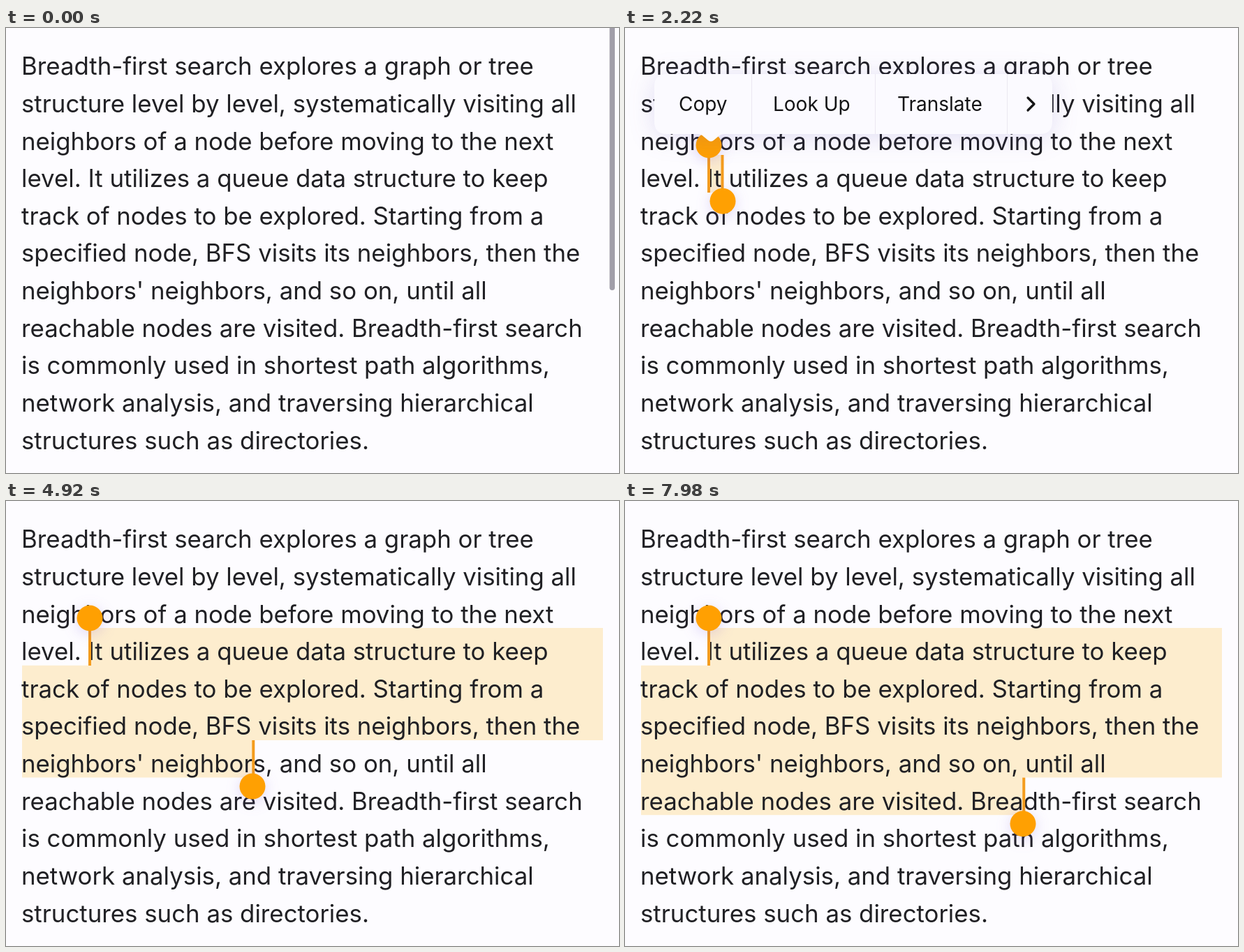
Write an HTML page that moves like this. It is 878x638 px and loops after 8 s.

```html
<!DOCTYPE html>
<html lang="en">
<head>
<meta charset="utf-8">
<title>Text selection</title>
<style>
  html, body { margin: 0; width: 100%; height: 100%; overflow: hidden; background: #fdfcff; }
  svg { display: block; width: 878px; height: 638px; }
  text { font-family: Inter, "Noto Sans", sans-serif; font-optical-sizing: none; white-space: pre; }
  #lines { font-size: 34.8px; fill: #202024; }
  .item { font-size: 28px; fill: #141416; }
  .knob { fill: #ffa002; filter: drop-shadow(0 4px 10px rgba(110, 70, 220, .2)); }
  .stem { stroke: #f49c1e; stroke-width: 4; }
  #wash { fill: #fdedce; }
  #bar, #glow, #menu, .selection { animation: 8s linear infinite; }
  #bar { animation-name: bar; }
  #glow { animation-name: glow; transform-origin: 135px 209px; }
  #menu { animation-name: menu; transform-origin: 130px 166px; }
  #panel { fill: #fbfaff; filter: drop-shadow(0 4px 18px rgba(80, 60, 180, .16)); }
  .selection { animation-name: selection; }

  @keyframes bar {
    0%, 1.25% { opacity: 1; }
    6%, 100% { opacity: 0; }
  }
  @keyframes selection {
    0%, 18% { opacity: 0; }
    18.8%, 100% { opacity: 1; }
  }
  @keyframes glow {
    0%, 18% { opacity: 0; transform: scale(.3); }
    20.25% { opacity: 1; transform: none; }
    23.5%, 100% { opacity: 0; transform: scale(1.05); }
  }
  @keyframes menu {
    0%, 18.5% { opacity: 0; transform: scale(.65); }
    20.25% { opacity: .87; transform: none; }
    21.25%, 37.25% { opacity: 1; transform: none; }
    38.75% { opacity: .72; transform: scale(.895); }
    40.75%, 100% { opacity: 0; transform: scale(.78); }
  }
</style>
</head>
<body>
<svg viewBox="0 0 878 638">
  <defs>
    <radialGradient id="halo">
      <stop offset="0" stop-color="#fde6cc"/>
      <stop offset=".55" stop-color="#fcf0c4"/>
      <stop offset=".92" stop-color="#fcf4cc"/>
      <stop offset="1" stop-color="#fcf4cc" stop-opacity="0"/>
    </radialGradient>
  </defs>
  <rect id="bar" x="864.5" y="-10" width="7.5" height="386" rx="3.75" fill="#a19ea9"/>
  <ellipse id="glow" cx="147" cy="204" rx="129" ry="95" fill="url(#halo)"/>
  <path id="wash" class="selection"/>
  <g id="lines"></g>
  <g class="selection">
    <path class="stem" d="M120 182V236"/>
    <circle class="knob" cx="120" cy="168" r="18.5"/>
    <path id="caret" class="stem"/>
    <rect id="grip" class="knob"/>
  </g>
  <g id="menu">
    <path id="panel" d="M60 66H594Q612 66 612 84V134Q612 152 594 152H142Q137 152 133 156L127 161Q123 164 119 161L113 156Q109 152 104 152H60Q42 152 42 134V84Q42 66 60 66Z"/>
    <path d="M181.5 66V152M358.5 66V152M547.5 66V152" stroke="#ebe8f1"/>
    <text class="item" x="77" y="119">Copy</text>
    <text class="item" x="212" y="119">Look Up</text>
    <text class="item" x="390" y="119">Translate</text>
    <path d="M577 100L586 109L577 118" fill="none" stroke="#141416" stroke-width="3.2" stroke-linecap="round" stroke-linejoin="round"/>
  </g>
</svg>
<script>
const LOOP = 8000, ROW = 53.65, LEFT = 23, RIGHT = 855, ANCHOR = 120, FIRST_ROW = 3, LAG = 120;
const copy = [
  "Breadth-first search explores a graph or tree",
  "structure level by level, systematically visiting all",
  "neighbors of a node before moving to the next",
  "level. It utilizes a queue data structure to keep",
  "track of nodes to be explored. Starting from a",
  "specified node, BFS visits its neighbors, then the",
  "neighbors' neighbors, and so on, until all",
  "reachable nodes are visited. Breadth-first search",
  "is commonly used in shortest path algorithms,",
  "network analysis, and traversing hierarchical",
  "structures such as directories."
];
const byId = id => document.getElementById(id);
const setAll = (el, attrs) => Object.entries(attrs).forEach(([k, v]) => el.setAttribute(k, v));

// Caret positions between the letters of each line
const stops = copy.map((words, i) => {
  const line = document.createElementNS("http://www.w3.org/2000/svg", "text");
  setAll(line, { x: 22, y: 67.2 + i * ROW });
  line.textContent = words;
  byId("lines").append(line);
  const starts = [...words].map((_, n) => line.getStartPositionOfChar(n).x + .8);
  return [...starts, line.getEndPositionOfChar(words.length - 1).x + .8];
});

// [time, value] tracks of the dragging finger
const fingerX = [[2820, 140], [3100, 191], [3400, 222], [3600, 232], [3940, 261], [4300, 290],
  [4750, 353], [5200, 353], [6550, 502], [6900, 502], [7800, 570]];
const lift = [[2980, 0], [3100, 1], [3300, 0]];
const rowTimes = [3640, 4460, 4660, 7200];

function track(keys, t) {
  if (t <= keys[0][0]) return keys[0][1];
  const i = keys.findIndex(k => k[0] > t);
  if (i < 0) return keys[keys.length - 1][1];
  const [t0, a] = keys[i - 1], [t1, b] = keys[i];
  return a + (b - a) * (t - t0) / (t1 - t0);
}
const ease = p => { p = Math.min(1, Math.max(0, p)); return p * p * (3 - 2 * p); };
const nearest = (list, x) => list.reduce((a, b) => Math.abs(b - x) < Math.abs(a - x) ? b : a);
const rowTop = row => 182 + (row - FIRST_ROW) * ROW;
const box = (x0, x1, row) => `M${x0} ${rowTop(row)}H${x1}V${rowTop(row + 1)}H${x0}Z`;

function draw(t) {
  const row = FIRST_ROW + rowTimes.filter(s => t >= s).length;
  const x = nearest(stops[row], track(fingerX, t));
  let wash = "";
  for (let r = FIRST_ROW; r <= row; r++)
    wash += box(r === FIRST_ROW ? ANCHOR : LEFT, r === row ? x : RIGHT, r);
  byId("wash").setAttribute("d", wash);
  byId("caret").setAttribute("d", `M${x} ${rowTop(row)}V${rowTop(row + 1)}`);

  const m = track(lift, t), w = 37 + 39 * m, h = 37 + 27 * m;
  const slide = rowTimes.reduce((sum, s) => sum + ease((t - s) / 150), 0);
  const cx = track(fingerX, t - LAG);
  const cy = rowTop(FIRST_ROW + 1 + slide) + 12.5 - 32 * m;
  setAll(byId("grip"), { x: cx - w / 2, y: cy - h / 2, width: w, height: h, rx: h / 2 });
}

const start = performance.now();
function frame() {
  draw((performance.now() - start) % LOOP);
  requestAnimationFrame(frame);
}
frame();
</script>
</body>
</html>
```
